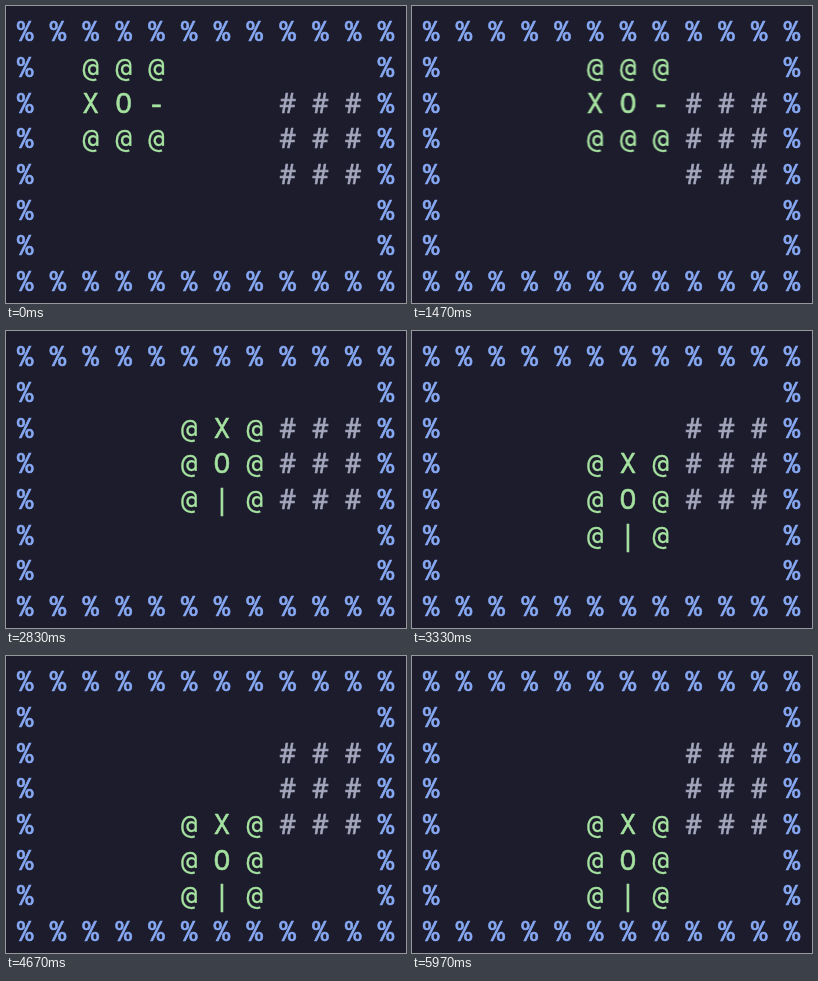
Animation, 400 px wide and 297 px high, one loop 6000 ms. Source, as an HTML page:

```html
<!DOCTYPE html>
<html lang="en">
<head>
<meta charset="utf-8">
<title>Tank grid</title>
<style>
  html, body { margin: 0; width: 100%; height: 100%; overflow: hidden; background: #1d1c2d; }
  svg { display: block; width: 100%; height: 100%; }
  text {
    font: 500 27.3px "Noto Sans Mono", "DejaVu Sans Mono", monospace;
    text-anchor: middle;
    fill: currentColor;
    stroke: currentColor;
    stroke-width: 0.6px;
  }
  .tread { font-family: "DejaVu Sans Mono", monospace; font-weight: 400; stroke-width: 0.3px; }
  #walls { color: #87a9f4; }
  #block { color: #a4a7bd; }
  #tank {
    --col: 32.8px;
    --row: 35.7px;
    color: #a6e3a1;
    animation: drive 6s step-end infinite;
  }
  #right { animation: face-right 6s step-end infinite; }
  #up { animation: face-up 6s step-end infinite; }
  #down { animation: face-down 6s step-end infinite; }

  @keyframes drive {
    0% { transform: translate(0, 0); }
    7.5% { transform: translate(var(--col), 0); }
    14% { transform: translate(calc(var(--col) * 2), 0); }
    20.5% { transform: translate(calc(var(--col) * 3), 0); }
    43% { transform: translate(calc(var(--col) * 3), var(--row)); }
    51% { transform: translate(calc(var(--col) * 3), calc(var(--row) * 2)); }
    64%, 100% { transform: translate(calc(var(--col) * 3), calc(var(--row) * 3)); }
  }
  @keyframes face-right {
    0% { visibility: visible; }
    32%, 100% { visibility: hidden; }
  }
  @keyframes face-up {
    0% { visibility: hidden; }
    32% { visibility: visible; }
    43%, 100% { visibility: hidden; }
  }
  @keyframes face-down {
    0% { visibility: hidden; }
    43%, 100% { visibility: visible; }
  }
</style>
</head>
<body>
<svg viewBox="0 0 400 297" preserveAspectRatio="none">
  <g id="walls"></g>
  <g id="block"></g>
  <g id="tank">
    <g id="right"></g>
    <g id="up"></g>
    <g id="down"></g>
  </g>
</svg>
<script>
  const COL = 32.8, ROW = 35.7, LEFT = 19.2, BASE = 35.2;

  // Draws rows of characters with the top-left cell at (col, row).
  function drawGrid(id, col, row, lines) {
    const group = document.getElementById(id);
    lines.forEach((line, r) => [...line].forEach((char, c) => {
      if (char === " ") return;
      const cell = document.createElementNS("http://www.w3.org/2000/svg", "text");
      cell.setAttribute("x", LEFT + (col + c) * COL);
      cell.setAttribute("y", BASE + (row + r) * ROW);
      if (char === "@") cell.setAttribute("class", "tread");
      cell.textContent = char;
      group.append(cell);
    }));
  }

  const edge = "%".repeat(12);
  const side = "%" + " ".repeat(10) + "%";
  drawGrid("walls", 0, 0, [edge, ...Array(6).fill(side), edge]);
  drawGrid("block", 8, 2, ["###", "###", "###"]);
  drawGrid("right", 2, 1, ["@@@", "XO-", "@@@"]);
  drawGrid("up", 2, 1, ["@|@", "@O@", "@X@"]);
  drawGrid("down", 2, 1, ["@X@", "@O@", "@|@"]);
</script>
</body>
</html>
```
